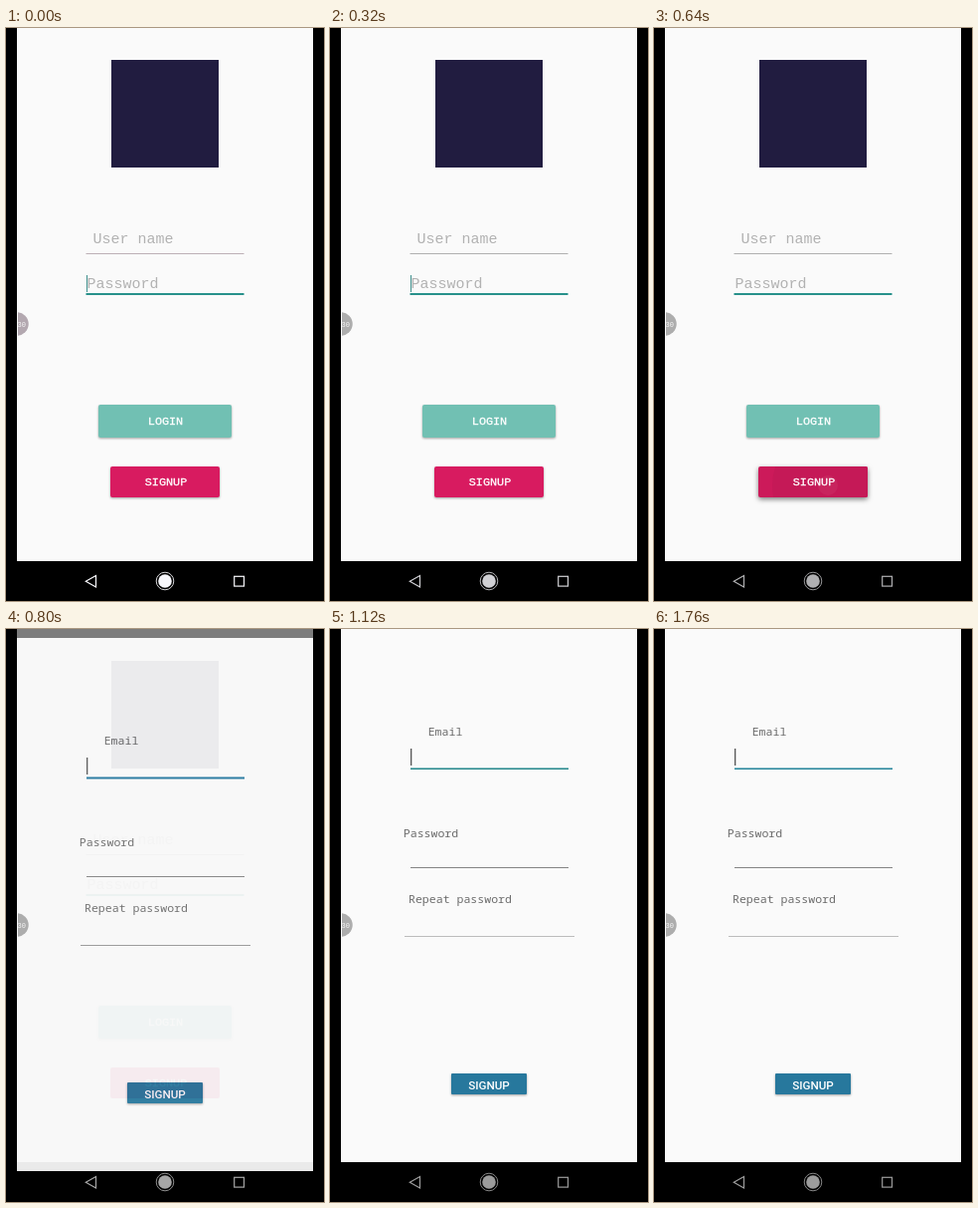
These frames come from a looping animation (320x575 px, 2.24 s). An HTML page:

```html
<!DOCTYPE html>
<html lang="en">
<head>
<meta charset="utf-8">
<title>Sign up flow</title>
<style>
  html, body { margin: 0; width: 100%; height: 100%; overflow: hidden; background: #000; }
  svg { display: block; width: 320px; height: 575px; }
  .typed { font-family: "Liberation Mono", monospace; }
  .hint { font-size: 15px; fill: #b2b2b2; }
  .cta { font-size: 11.8px; fill: #fff; stroke: #fff; stroke-width: .3px; text-anchor: middle; }
  .label { font: 11.55px "Noto Sans Mono", monospace; fill: #6c6c6c; }
  .submit { font: 500 11.7px Roboto, sans-serif; fill: #fff; text-anchor: middle; }
  .raised { filter: drop-shadow(0 1px 1px rgba(0, 0, 0, .35)); }

  /* Every change is a hard step on the shared 2240 ms loop. */
  .anim { animation: 2240ms step-end infinite; }
  #login { animation-name: login; }
  #veil { animation-name: entering; }
  #register { animation-name: register; }
  #blink1 { animation-name: blink1; }
  #blink2 { animation-name: blink2; }
  #press { animation-name: press; }
  #ripple { animation-name: ripple; }
  #nav { animation-name: nav; }
  #bubble { animation-name: bubble; }
  #userLine { animation-name: user-line; }
  #focusLine { animation-name: focus-line; }
  #lastLine { animation-name: last-line; }

  @keyframes login { 0% { visibility: visible } 42.857%, 100% { visibility: hidden } }
  @keyframes entering { 0% { opacity: 0 } 35.714% { opacity: 1 } 42.857%, 100% { opacity: 0 } }
  @keyframes register {
    0% { opacity: 0; transform: translateY(9px) }
    35.714% { opacity: .94; transform: translateY(9px) }
    42.857%, 100% { opacity: 1; transform: none }
  }
  @keyframes blink1 { 0% { opacity: 1 } 21.428%, 100% { opacity: 0 } }
  @keyframes blink2 { 0% { opacity: 1 } 57.142% { opacity: 0 } 78.571%, 100% { opacity: 1 } }
  @keyframes press {
    0% { fill: #d81b60; filter: drop-shadow(0 1px 1px rgba(0, 0, 0, .35)) }
    28.571% { fill: #cc1a5a; filter: drop-shadow(0 2px 2.5px rgba(0, 0, 0, .5)) }
    35.714%, 100% { fill: #d81b60; filter: none }
  }
  @keyframes ripple { 0% { opacity: 0 } 28.571% { opacity: 1 } 35.714%, 100% { opacity: 0 } }
  @keyframes nav {
    0% { color: #f8f8fc }
    7.142% { color: #e4e4e8 }
    14.285% { color: #d0d0d4 }
    21.428% { color: #c0c0c2 }
    28.571% { color: #b0b0b2 }
    35.714% { color: #a6a6a6 }
    42.857%, 100% { color: #9c9c9c }
  }
  @keyframes bubble { 0% { fill: #b3a8b0 } 14.285%, 100% { fill: #adadad } }
  @keyframes user-line { 0% { fill: #bdb0b6 } 14.285%, 100% { fill: #b0b0b0 } }
  @keyframes focus-line {
    0% { fill: #23789f; height: 2px }
    42.857% { fill: #23878b; height: 1.5px }
    57.142%, 100% { fill: #23849a; height: 1.5px }
  }
  @keyframes last-line { 0% { fill: #999 } 42.857%, 100% { fill: #bcbcbc } }
</style>
</head>
<body>
<svg viewBox="0 0 320 575">
  <clipPath id="screen"><rect x="11" width="298" height="575"/></clipPath>
  <clipPath id="edge"><rect x="12" y="280" width="20" height="34"/></clipPath>
  <clipPath id="button"><rect x="105" y="440" width="110" height="31" rx="2"/></clipPath>
  <rect width="320" height="575"/>

  <g clip-path="url(#screen)">
    <g id="login" class="anim">
      <rect x="11" width="298" height="535" fill="#fafafa"/>
      <rect x="106" y="32" width="108" height="108" fill="#211c40"/>

      <text class="typed hint" x="87.5" y="216.4">User name</text>
      <rect id="userLine" class="anim" x="80.5" y="226" width="159" height="1"/>
      <text class="typed hint" x="81.5" y="260.9">Password</text>
      <rect x="80.5" y="266" width="159" height="2" fill="#28918b"/>
      <rect id="blink1" class="anim" x="81" y="248" width="1" height="17" fill="#3f8f8c"/>

      <rect class="raised" x="93" y="378" width="134" height="33" rx="2" fill="#71c0b3"/>
      <text class="typed cta" x="160.5" y="398">LOGIN</text>
      <rect id="press" class="anim" x="105" y="440" width="110" height="31" rx="2"/>
      <g id="ripple" class="anim" clip-path="url(#button)">
        <circle cx="175" cy="459" r="56" fill="#c51957"/>
        <circle cx="175" cy="459" r="10" fill="#d04070" fill-opacity=".3"/>
      </g>
      <text class="typed cta" x="161" y="459">SIGNUP</text>
    </g>

    <g id="veil" class="anim">
      <rect x="11" width="298" height="535" fill-opacity=".15"/>
      <rect x="11" width="298" height="9" fill="#7c7c7c"/>
    </g>

    <g id="register" class="anim">
      <rect x="11" width="298" height="535" fill="#fafafa"/>
      <text class="label" x="98.7" y="107.3">Email</text>
      <rect id="blink2" class="anim" x="81" y="120" width="1.3" height="17" fill="#555"/>
      <rect id="focusLine" class="anim" x="81" y="139.5" width="159" height="1.5"/>
      <text class="label" x="73.8" y="209.3">Password</text>
      <rect x="81" y="239" width="159" height="1" fill="#858585"/>
      <text class="label" x="79" y="275.3">Repeat password</text>
      <rect id="lastLine" class="anim" x="75" y="308" width="171" height="1"/>
      <rect class="raised" x="122" y="446" width="76" height="21" rx="1" fill="#27789d"/>
      <text class="submit" x="160" y="461.5">SIGNUP</text>
    </g>
  </g>

  <g clip-path="url(#edge)">
    <circle id="bubble" class="anim" cx="11" cy="297" r="11.7"/>
    <text class="typed" x="11.5" y="299.5" font-size="7" fill="#f4f4f4">30</text>
  </g>

  <g id="nav" class="anim" fill="none" stroke="currentColor" stroke-width="1.2">
    <path d="M90.5 549.5V561L80.3 555.2Z"/>
    <circle cx="160" cy="555" r="8.8" stroke-width="1" stroke-opacity=".85"/>
    <circle cx="160" cy="555" r="6.8" fill="currentColor" stroke="none"/>
    <rect x="229.7" y="550.3" width="9.8" height="9.8"/>
  </g>
</svg>
</body>
</html>
```
